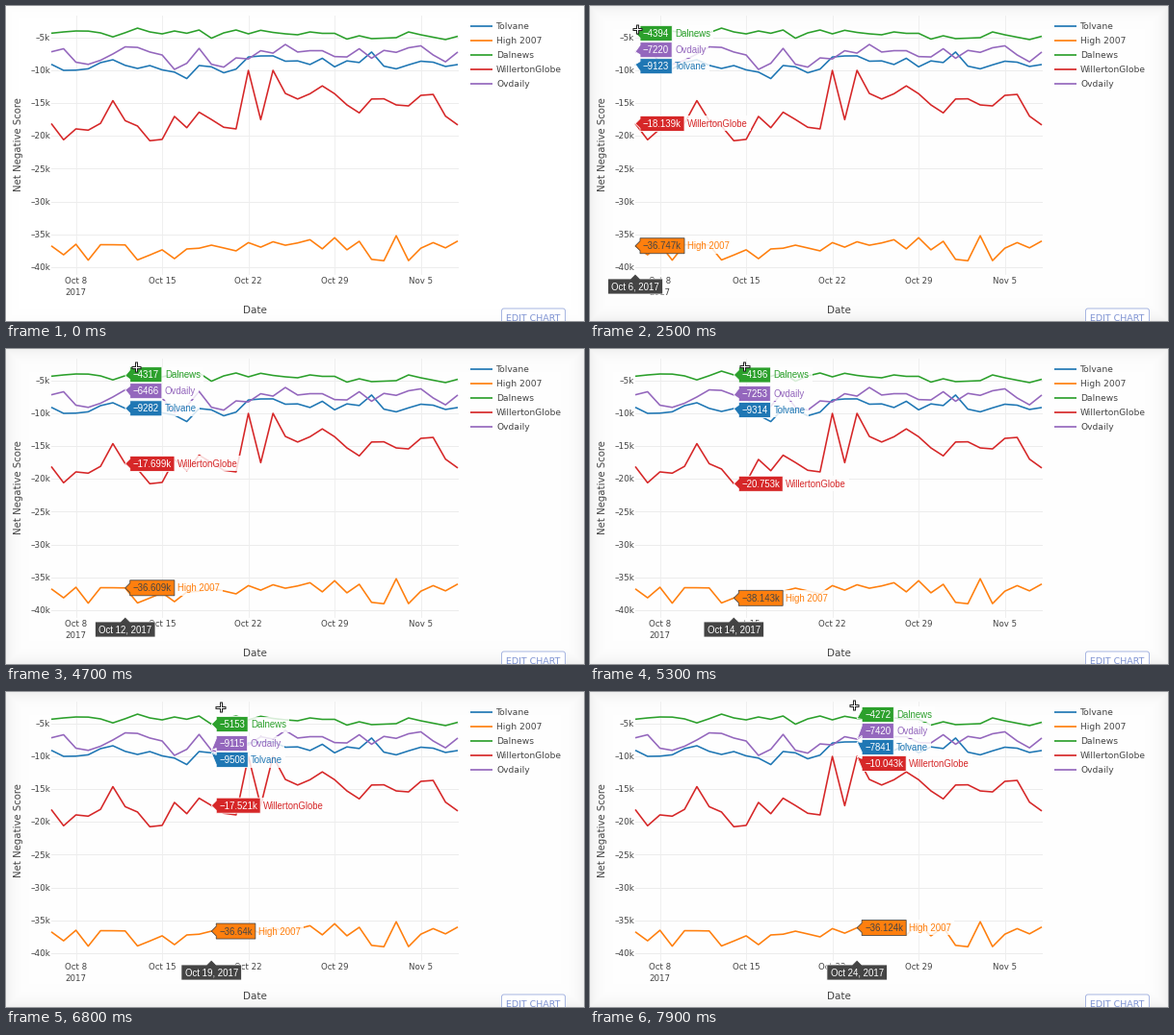
Animation of 600x328 px, one loop 8 s. Source, as a matplotlib script:

```python
import numpy as np
import matplotlib.pyplot as plt
from matplotlib.animation import FuncAnimation
from matplotlib.patches import FancyBboxPatch, Polygon, Rectangle

W, H, DPI = 600, 328, 100
PT = 72 / DPI  # points per pixel
LEFT, RIGHT, TOP, BOTTOM = 47, 469, 10, 279
DAY = (RIGHT - LEFT) / 33
INK = "#444444"
UI_FONT, HOVER_FONT = "DejaVu Sans", "Liberation Sans"
HOVER_SIZE, ROW = 9.7, 17

wire = [9123, 10043, 10012, 9806, 8871, 8432, 9282, 9753, 9314, 9968, 10309,
        11291, 9306, 9508, 10412, 9854, 8012, 7853, 7841, 8652, 8604, 9153,
        8209, 9507, 8603, 8851, 7254, 9403, 9812, 9207, 8653, 8802, 9451, 9156]
high = [36747, 38112, 36504, 38926, 36572, 36578, 36609, 38894, 38143, 37352,
        38696, 37222, 37108, 36640, 37069, 37512, 36253, 36947, 36124, 36652,
        36304, 35811, 37203, 35508, 37352, 36054, 38804, 39011, 35207, 38996,
        37104, 36253, 37052, 36008]
news = [4394, 4198, 4053, 4071, 4342, 4951, 4317, 3617, 4196, 4493, 4052, 4400,
        3904, 5153, 4343, 3902, 4489, 3948, 4272, 4486, 4631, 4197, 4414, 4412,
        5287, 4783, 5217, 5146, 5071, 4198, 4634, 4998, 5362, 4857]
globe = [18139, 20604, 18952, 19146, 18103, 14648, 17699, 18512, 20753, 20547,
         17054, 18768, 16407, 17521, 18704, 18953, 10052, 17549, 10043, 13552,
         14403, 13604, 12407, 13598, 15302, 16513, 14404, 14371, 15304, 15452,
         13846, 13703, 17008, 18354]
daily = [7220, 6753, 8804, 9132, 8507, 7552, 6466, 6548, 7253, 7704, 9897, 8973,
         6704, 9115, 9553, 8148, 8304, 7052, 7420, 6104, 7253, 7049, 7051, 7948,
         8003, 6752, 8204, 7006, 7303, 6604, 6307, 7702, 8749, 7254]

SERIES = [("Tolvane", "#1f77b4", wire), ("High 2007", "#ff7f0e", high),
          ("Dalnews", "#2ca02c", news), ("WillertonGlobe", "#d62728", globe),
          ("Ovdaily", "#9467bd", daily)]


def day_x(i):
    return LEFT + DAY * np.asarray(i)


def score_y(v):
    return 32.5 + (np.asarray(v) / 1000 - 5) * 6.843


fig = plt.figure(figsize=(W / DPI, H / DPI), dpi=DPI, facecolor="white")
ax = fig.add_axes([0, 0, 1, 1])
ax.axis("off")
renderer = fig.canvas.get_renderer()


def write(x, y, s, size, color=INK, font=UI_FONT, ha="left", z=3):
    """Text whose capitals are vertically centred on y."""
    return ax.text(x, y + 0.36 * size, s, fontsize=size * PT, color=color,
                   family=font, ha=ha, va="baseline", zorder=z)


def line(x, y, color, width, z=2, **kw):
    return ax.plot(x, y, color=color, lw=width * PT, zorder=z, **kw)[0]


def text_width(artist):
    return artist.get_window_extent(renderer).width


# Soft inset shadow around the stage
gx, gy = np.meshgrid(np.arange(W) + 0.5, np.arange(H) + 0.5)
edge = np.minimum(np.minimum(gx, W - gx), np.minimum(gy, H - gy))
shade = np.zeros((H, W, 4))
shade[..., 3] = 0.006 + 0.06 * np.exp(-edge / 7)
shadow = ax.imshow(shade, extent=(0, W, H, 0), aspect="auto", zorder=0)
ax.set(xlim=(0, W), ylim=(H, 0))

# Axes and grid
for k in range(5, 45, 5):
    y = score_y(k * 1000)
    line([LEFT, RIGHT], [y, y], "#ebebeb", 0.9, 1)
    write(46, y, f"\u2013{k}k", 8.9, ha="right")
for i, label in zip(range(2, 34, 7), ["Oct 8", "Oct 15", "Oct 22", "Oct 29", "Nov 5"]):
    x = day_x(i)
    line([x, x], [TOP, BOTTOM], "#eeeeee", 0.9, 1)
    write(x, 286, label, 8.7, ha="center")
write(day_x(2), 297.5, "2017", 8.7, ha="center")
write(258, 316, "Date", 10.4, ha="center")
ax.text(13.5, 144, "Net Negative Score", fontsize=10.1 * PT, color=INK,
        family=UI_FONT, rotation=90, ha="center", va="center")

# Curves and legend
for row, (name, color, values) in enumerate(SERIES):
    line(day_x(range(34)), score_y(values), color, 1.6, solid_joinstyle="round",
         solid_capstyle="butt")
    y = 21 + 14.9 * row
    line([481.5, 504.5], [y, y], color, 1.7, solid_capstyle="butt")
    write(509, y, name, 9.2)

# Button cut by the lower edge
ax.add_patch(FancyBboxPatch((514.5, 315), 66, 18, fc="white", ec="#a9b7e2",
                            boxstyle="round,pad=0,rounding_size=2.5", lw=PT))
write(547.5, 324.2, "EDIT CHART", 9.5, "#7f93d2", ha="center")


def spread(ys):
    """Shift sorted label centres as little as possible to keep ROW apart."""
    blocks = []
    for i, y in enumerate(ys):
        blocks.append([y - ROW * i, 1])
        while len(blocks) > 1 and blocks[-2][0] > blocks[-1][0]:
            b, n = blocks.pop()
            a, m = blocks.pop()
            blocks.append([(a * m + b * n) / (m + n), m + n])
    flat = [mean for mean, n in blocks for _ in range(n)]
    return [v + ROW * i for i, v in enumerate(flat)]


def score_text(v):
    return f"\u2212{v / 1000:.5g}k" if v >= 9800 else f"\u2212{v}"


def hover_label(x, y, cy, name, color, value):
    ink = INK if name == "High 2007" else "white"
    number = write(x + 8, cy, score_text(value), HOVER_SIZE, ink, HOVER_FONT, z=7)
    right = x + 11 + text_width(number)
    title = write(right + 3, cy, name, HOVER_SIZE, color, HOVER_FONT, z=7)
    back = Rectangle((right, cy - 8), text_width(title) + 6, 16,
                     fc="white", ec="none", alpha=0.82, zorder=5)
    left = x + 5
    box = Polygon([(x, y), (left, cy - 5), (left, cy - 8), (right, cy - 8),
                   (right, cy + 8), (left, cy + 8), (left, cy + 5)],
                  fc=color, ec=ink, lw=0.8 * PT, zorder=6)
    return [number, title, ax.add_patch(back), ax.add_patch(box)]


def date_label(x, i):
    label = write(x, 292.2, f"Oct {6 + i}, 2017", HOVER_SIZE, "white",
                  HOVER_FONT, ha="center", z=9)
    half = text_width(label) / 2 + 3.7
    box = Polygon([(x, BOTTOM), (x + 5, 284), (x + half, 284), (x + half, 300),
                   (x - half, 300), (x - half, 284), (x - 5, 284)],
                  fc=INK, ec="white", lw=0.8 * PT, zorder=8)
    return [label, ax.add_patch(box)]


def hover(i):
    x = float(day_x(i))
    rows = sorted((float(score_y(v[i])), name, color, v[i])
                  for name, color, v in SERIES)
    parts = date_label(x, i)
    for cy, (y, name, color, value) in zip(spread([r[0] for r in rows]), rows):
        parts += hover_label(x, y, cy, name, color, value)
    return parts


def arrow_cursor(x, y):
    shape = np.array([(0, 0), (0, 11), (2.6, 8.7), (4.4, 12.8), (6, 12.1),
                      (4.3, 8), (7.6, 8)])
    return [ax.add_patch(Polygon(shape + (x, y), fc="black", ec="white",
                                 lw=0.8 * PT, zorder=12))]


def cross_cursor(x, y):
    parts = []
    for color, width, r, z in [("#222222", 3, 5.3, 12), ("white", 1, 4.4, 13)]:
        parts.append(line([x - r, x + r], [y, y], color, width, z, solid_capstyle="butt"))
        parts.append(line([x, x], [y - r, y + r], color, width, z, solid_capstyle="butt"))
    return parts


KEY_TIMES = [21, 25, 36, 47, 59, 68, 79]
CROSS_X = [47.5, 49, 92, 135, 185.5, 222.5, 274]
CROSS_Y = [25, 24, 23, 18.5, 17.5, 15.5, 13.5]
HOVER_DAY = [0, 0.2, 3, 6.2, 10.7, 13.4, 17.8]
moving = []


def draw(frame):
    while moving:
        moving.pop().remove()
    shadow.set_alpha(min(1, 0.25 + 0.15 * frame))
    if 10 <= frame < 21:
        u = min(1, (frame - 10) / 8)
        u = 1 - (1 - u) ** 2
        moving.extend(arrow_cursor(7 + 33 * u, -7 + 27 * u))
    elif frame >= 21:
        x, y, day = (np.interp(frame, KEY_TIMES, k)
                     for k in (CROSS_X, CROSS_Y, HOVER_DAY))
        moving.extend(hover(int(round(day))))
        moving.extend(cross_cursor(x, y))
    return moving


anim = FuncAnimation(fig, draw, frames=80, interval=100, init_func=lambda: draw(0),
                     repeat=True, repeat_delay=0, blit=False)
plt.show()
```
